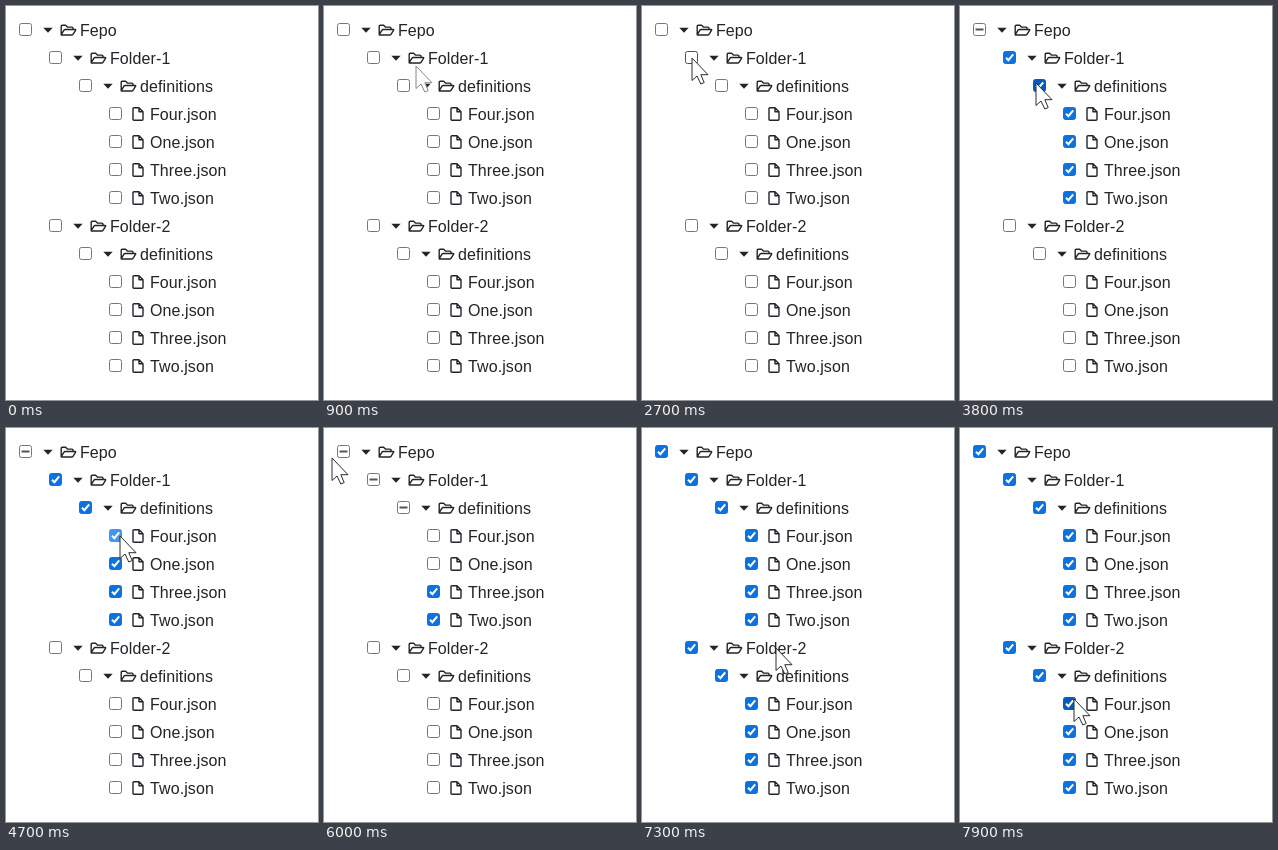
Animation, 312 px wide and 394 px high, one loop 8 s. Source, as an HTML page:

```html
<!DOCTYPE html>
<html lang="en">
<head>
<meta charset="utf-8">
<title>Checkbox tree</title>
<style>
  html, body { margin: 0; width: 100%; height: 100%; overflow: hidden; background: #fefefe; }
  svg { display: block; width: 312px; height: 394px; }
  text { font: 16px "Liberation Sans", Arial, sans-serif; letter-spacing: .1px; fill: #212529; }
  .icon { fill: none; stroke: #212529; stroke-width: 1.4; stroke-linejoin: round; }
  .tick { fill: none; stroke: #fff; stroke-width: 2; }
  .dash { stroke: #555; stroke-width: 2; }
  .cursor { fill: #fefefe; stroke-linejoin: round; }
</style>
</head>
<body>
<svg id="stage" viewBox="0 0 312 394"></svg>
<script>
const LOOP = 8000, STEP = 100, ROW = 28;
const stage = document.getElementById('stage');

const files = ['Four.json', 'One.json', 'Three.json', 'Two.json'];
const branch = name => [[name, 1], ['definitions', 2], ...files.map(f => [f, 3])];
const rows = [['Fepo', 0], ...branch('Folder-1'), ...branch('Folder-2')]
  .map(([label, depth], i) => ({ label, depth, x: 13 + 30 * depth, y: 24 + ROW * i }));

// Leaves below each row, by row index
rows.forEach((row, i) => {
  let end = i + 1;
  while (end < rows.length && rows[end].depth > row.depth) end++;
  row.leaves = [];
  for (let k = i; k < end; k++) if (rows[k].depth === 3) row.leaves.push(k);
});

// [time, row] of each toggle
const clicks = [[3300, 1], [4800, 3], [5200, 4], [6500, 0]];

// [time, x, y] of the pointer tip
const path = [
  [200, 180, 150], [600, 100, 62], [800, 100, 62], [1000, 84, 58], [1400, 84, 58],
  [1600, 72, 53], [2100, 72, 53], [2200, 60, 53], [2500, 50, 52], [3400, 50, 52],
  [3800, 76, 77], [4100, 80, 80], [4200, 80, 80], [4400, 114, 108], [4900, 114, 108],
  [5200, 114, 137], [5300, 114, 137], [5900, 3, 33], [6000, 8, 30], [6300, 17, 24],
  [6900, 17, 24], [7300, 134, 220], [7700, 114, 271], [8000, 114, 271]
];

function add(parent, tag, attrs = {}) {
  const el = document.createElementNS('http://www.w3.org/2000/svg', tag);
  for (const k in attrs) el.setAttribute(k, attrs[k]);
  parent.append(el);
  return el;
}
const show = (el, on) => el.setAttribute('visibility', on ? 'visible' : 'hidden');

const FOLDER = 'M1.2 10.2V2Q1.2.8 2.4.8H5.6L7.4 2.6H11.8Q13 2.6 13 3.8V5M1.2 10.2L4 5.6Q4.4 5 5.2 5H15.2Q16 5 15.5 5.8L13 9.8Q12.6 10.5 11.8 10.5H1.5Z';
const FILE = 'M2 .8H7L11 4.8V12.2Q11 13.2 10 13.2H2Q1 13.2 1 12.2V1.8Q1 .8 2 .8ZM7 .8V4.8H11';

for (const row of rows) {
  const g = add(stage, 'g', { transform: `translate(${row.x} ${row.y})` });
  row.box = add(g, 'rect', { x: .5, y: -6.5, width: 12, height: 12, rx: 2 });
  row.tick = add(g, 'path', { class: 'tick', d: 'M3 -.3L5.4 2.2L10.2 -3.7' });
  row.dash = add(g, 'path', { class: 'dash', d: 'M2.5 -.5H10.5' });
  const leaf = row.depth === 3;
  if (!leaf) add(g, 'path', { d: 'M24.3 -2.3H33.7L29 2.8Z', fill: '#212529' });
  add(g, 'path', {
    class: 'icon', d: leaf ? FILE : FOLDER,
    transform: leaf ? 'translate(23 -7)' : 'translate(41 -5.5)'
  });
  add(g, 'text', { x: leaf ? 41 : 61, y: 6 }).textContent = row.label;
}

const arrow = add(stage, 'path', {
  class: 'cursor', d: 'M0 0V22.5L5 18L8.8 26L12.2 24.5L8.8 16.7H16Z'
});
const hand = add(stage, 'path', {
  class: 'cursor', stroke: '#333', 'stroke-width': 1.2,
  d: 'M-2.5 3Q-2.5 .5 0 .5T2.5 3V12Q3 10 5 10T7 12.5Q7.5 11 9 11T11 13.5Q11.5 12 13 12.3T15 15V22Q15 26 12 31H-1Q-1 28 -4 25L-9 18Q-9.5 15.5 -7 15.5Q-5.5 15.5 -2.5 19Z'
});

function pointer(t) {
  const k = path.findIndex(p => t < p[0]);
  if (k < 1) return null;
  const [t0, x0, y0] = path[k - 1], [t1, x1, y1] = path[k];
  const u = (t - t0) / (t1 - t0);
  return { x: x0 + (x1 - x0) * u, y: y0 + (y1 - y0) * u, moving: u > 0 && (x0 !== x1 || y0 !== y1) };
}

function checkedLeaves(t) {
  const on = new Set();
  for (const [time, i] of clicks) {
    if (t < time) break;
    const { leaves } = rows[i], full = leaves.every(k => on.has(k));
    leaves.forEach(k => full ? on.delete(k) : on.add(k));
  }
  return on;
}

function render(t) {
  const p = pointer(t), on = checkedLeaves(t);
  let overToggle = false;
  rows.forEach((row, i) => {
    const dx = p ? p.x - row.x : -99, dy = p ? Math.abs(p.y - row.y) : 99;
    const hover = dx >= 0 && dx <= 13 && dy <= 6.5;
    const pressed = clicks.some(c => c[1] === i && t >= c[0] - STEP && t < c[0]);
    const count = row.leaves.filter(k => on.has(k)).length;
    const full = count === row.leaves.length;
    const blue = pressed ? '#4295f0' : hover ? '#075ab8' : '#0b72e0';
    const grey = pressed ? '#8d8d8d' : hover ? '#4f4f4f' : '#767676';
    row.box.setAttribute('fill', full ? blue : '#fff');
    row.box.setAttribute('stroke', full ? blue : grey);
    show(row.tick, full);
    show(row.dash, count && !full);
    if (row.depth < 3 && Math.abs(dx - 29) < 8 && dy < 7) overToggle = true;
  });
  show(arrow, p && !overToggle);
  show(hand, p && overToggle);
  if (!p) return;
  const at = `translate(${p.x} ${p.y})`;
  arrow.setAttribute('transform', at);
  arrow.setAttribute('stroke', p.moving ? '#888' : '#2c2c2c');
  hand.setAttribute('transform', at);
}

const start = performance.now();
function tick() {
  const t = (performance.now() - start) % LOOP;
  render(Math.floor(t / STEP) * STEP);
  requestAnimationFrame(tick);
}
tick();
</script>
</body>
</html>
```
